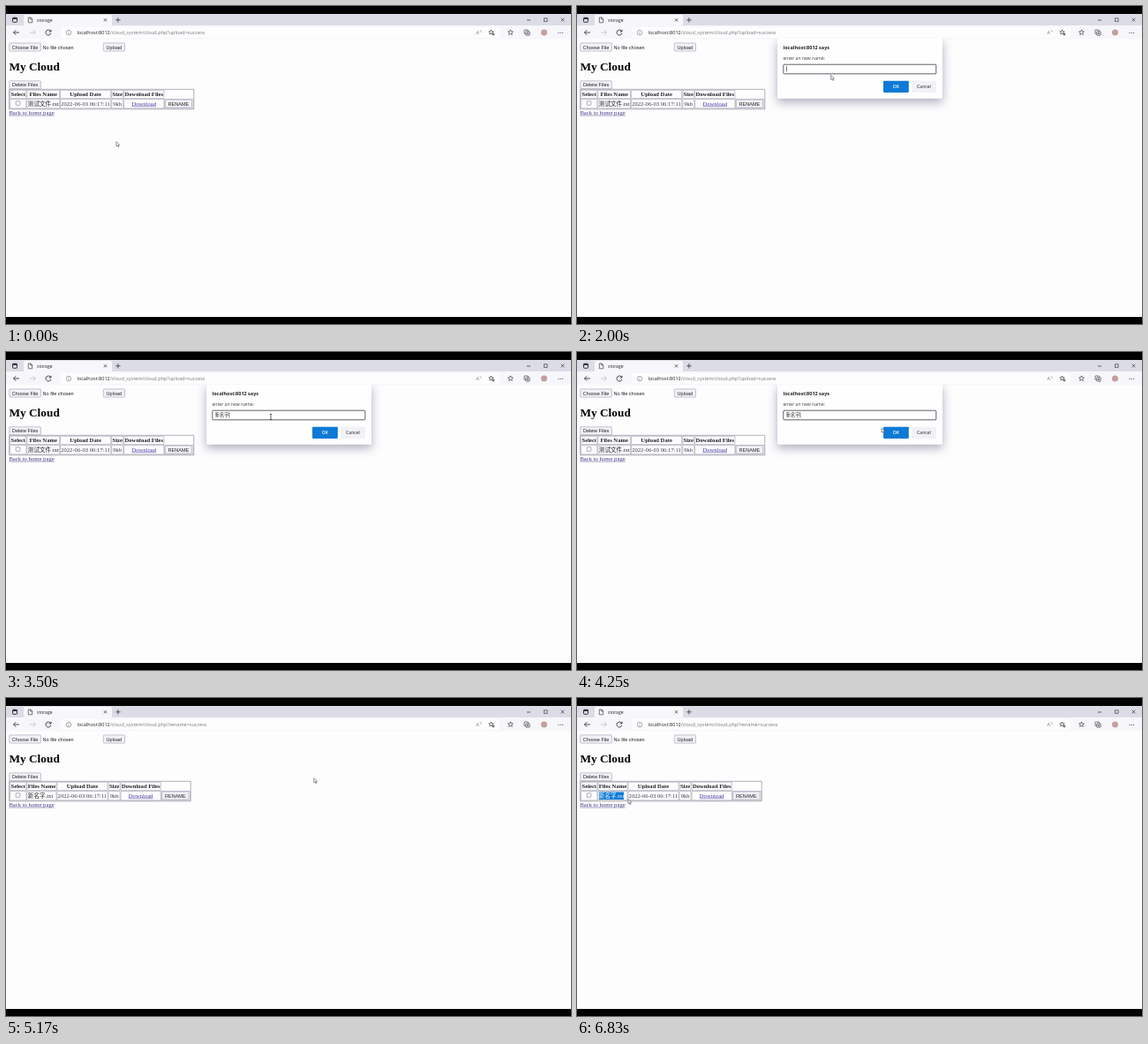
Recreate the animation shown at these times as an HTML page with a canvas. Size 640x360 px, loop 6.91 s.

```html
<!DOCTYPE html>
<html lang="en">
<head>
<meta charset="utf-8">
<title>Renaming a file</title>
<style>
  html, body { margin: 0; width: 100%; height: 100%; overflow: hidden; background: #000; }
  canvas { display: block; width: 100vw; height: 100vh; }
</style>
</head>
<body>
<canvas id="stage" width="640" height="360"></canvas>
<script>
const ctx = document.getElementById('stage').getContext('2d');
const LOOP = 6910, STEP = 83.3;
const UI = '"Open Sans", "Noto Sans CJK SC", sans-serif';
const ARIAL = '"Liberation Sans", sans-serif';
const TIMES = '"Liberation Serif", "Noto Sans CJK SC", serif';
const INK = '#202026', GREY = '#74747e', LINE = '#8e8e9e';
const BAR = '#dcdce6', TOOLBAR = '#f7f7fb', BLUE = '#0c7ad6';

const DIALOG_OPEN = 880, DIALOG_CLOSE = 4960, RELOADED = 5080;
const COMMIT = 3330, PRESS = 4640, SELECT_FROM = 6250, SELECT_TO = 6700;
const KEY_TIMES = [2330, 2415, 2500, 2640, 2720, 2830, 2920, 3080, 3160];

// Pointer stops: time, x, y
const POINTER = [
  [0, 125, 153.5], [80, 125, 153.5], [700, 195, 109], [900, 195, 109],
  [1150, 222, 103.5], [1550, 222, 103.5], [2150, 300, 73.5], [3830, 300, 73.5],
  [4450, 360, 90], [5080, 360, 90], [5850, 26.5, 108.5], [6250, 26.5, 108.5],
  [6750, 58, 114.5], [LOOP, 58, 114.5]
];

// Text is laid out large and scaled down so small sizes keep exact advances.
function text(str, x, y, size, family, color = INK, { align = 'left', weight = 400 } = {}) {
  ctx.save();
  ctx.translate(x, y);
  ctx.scale(0.1, 0.1);
  ctx.font = `${weight} ${size * 10}px ${family}`;
  ctx.textAlign = align;
  ctx.fillStyle = color;
  ctx.fillText(str, 0, 0);
  const width = ctx.measureText(str).width / 10;
  ctx.restore();
  return width;
}

function rect(x, y, w, h, fill, border, radius = 0, lineWidth = 0.6) {
  ctx.beginPath();
  ctx.roundRect(x, y, w, h, radius);
  if (fill) { ctx.fillStyle = fill; ctx.fill(); }
  if (border) { ctx.strokeStyle = border; ctx.lineWidth = lineWidth; ctx.stroke(); }
}

function stroke(path, color = INK, width = 0.7) {
  ctx.strokeStyle = color;
  ctx.lineWidth = width;
  ctx.stroke(new Path2D(path));
}

function circle(x, y, r, fill, border) {
  rect(x - r, y - r, r * 2, r * 2, fill, border, r);
}

function cross(x, y, r, color) {
  stroke(`M${x - r} ${y - r}l${r * 2} ${r * 2}m0 ${-r * 2}l${-r * 2} ${r * 2}`, color);
}

function star(x, y, r) {
  ctx.beginPath();
  for (let i = 0; i < 10; i++) {
    const a = -Math.PI / 2 + i * Math.PI / 5, d = i % 2 ? r * 0.45 : r;
    ctx.lineTo(x + d * Math.cos(a), y + d * Math.sin(a));
  }
  ctx.closePath();
  ctx.strokeStyle = INK;
  ctx.lineWidth = 0.6;
  ctx.stroke();
}

function drawBrowser(loading, query) {
  rect(0, 0, 640, 360, '#000');
  rect(0, 9, 640, 343, '#fdfdfe');
  rect(0, 9, 640, 13.5, BAR);
  rect(0, 22, 640, 15.5, TOOLBAR);
  rect(20, 10, 100, 13, TOOLBAR, null, [2, 2, 0, 0]);
  rect(62, 24, 497, 12, '#fdfdfe', null, 2);

  rect(7.5, 13.3, 5, 5, null, INK, 1, 0.9);
  rect(7.5, 13.3, 5, 1.6, INK);
  if (!loading) stroke('M25.3 13h2.6l1.8 1.8v4h-4.4zM27.7 13v2h2', INK, 0.6);
  text('storage', 35, 17.6, 5, UI);
  cross(112.5, 15.8, 1.6);
  stroke('M124.2 15.8h5.4m-2.7-2.7v5.4');
  stroke('M590 16h4');
  rect(609.5, 13.8, 3.6, 3.6, null, INK);
  cross(630.5, 15.6, 1.8);

  stroke('M15 30h-6.5m2.8-2.8l-2.8 2.8l2.8 2.8', INK, 0.8);
  stroke('M27 30h6.5m-2.8-2.8l2.8 2.8l-2.8 2.8', '#bcbcc6', 0.8);
  if (loading) cross(48, 30, 2.3);
  else stroke('M50.7 28.8a3 3 0 1 0 .2 2M51 26.8v2.2h-2.3', INK, 0.8);
  circle(71, 30.2, 2.8, null, GREY);
  stroke('M71 29.8v2M71 28.4v.7', GREY, 0.6);
  const host = text('localhost:8012', 80.5, 32.3, 5.52, UI);
  text('/cloud_system/cloud.php?' + query, 80.5 + host, 32.3, 5.52, UI, GREY);

  text('A', 532.5, 32.2, 5.5, UI, GREY);
  stroke('M537 27.2q1.4 1 1 2.6', GREY, 0.6);
  star(549.5, 29.8, 2.8);
  circle(552, 32, 1.4, GREY);
  star(571.5, 30, 3.1);
  rect(587, 27, 4.4, 4.6, null, INK, 0.7);
  rect(588.8, 28.8, 4.4, 4.4, TOOLBAR, INK, 0.7);
  stroke('M589.8 31h2.4m-1.2-1.2v2.4', INK, 0.6);
  circle(609.5, 30, 3.5, '#c3a09c');
  for (const x of [626, 628.3, 630.6]) circle(x, 30.2, 0.55, INK);
}

function button(label, x, y, w, h) {
  rect(x, y, w, h, '#f1f1f6', '#a0a0b2', 0.8);
  text(label, x + w / 2, y + h / 2 + 2, 5.55, ARIAL, INK, { align: 'center' });
}

function link(label, x, y, color, size = 6.62) {
  const width = text(label, x, y, size, TIMES, color);
  rect(x, y + 0.7, width, 0.5, color);
}

function drawPage(renamed, selection) {
  const shift = renamed ? -3.6 : 0;
  button('Choose File', 3.8, 41.9, 35.6, 9.2);
  text('No file chosen', 41.5, 48.5, 5.55, ARIAL);
  button('Upload', 110.3, 41.9, 24.2, 9.2);
  text('My Cloud', 3.4, 72.8, 13.33, TIMES, '#000', { weight: 700 });
  button('Delete Files', 3.8, 84.8, 35.6, 9);

  rect(3.6, 94.3, 209.2 + shift, 22.5, null, '#7c7c8c');
  const columns = [
    ['Select', 4.7, 18.2], ['Files Name', 23.8, 36.8 + shift],
    ['Upload Date', 61.5 + shift, 57.2], ['Size', 119.7 + shift, 13],
    ['Download Files', 133.7 + shift, 45.2], ['', 179.8 + shift, 32.2]
  ];
  for (const [title, x, w] of columns) {
    if (title) rect(x, 95.3, w, 9.3, null, LINE, 0, 0.5);
    rect(x, 105.5, w, 10.3, null, LINE, 0, 0.5);
    text(title, x + w / 2, 102.1, 6.62, TIMES, INK, { align: 'center', weight: 700 });
  }

  rect(11.2, 107.7, 4.6, 4.6, '#fff', GREY, 0.7);
  const name = renamed ? '新名字.txt' : '测试文件.txt';
  const nameWidth = text(name, 24.8, 112.9, 6.6, TIMES);
  if (selection > 0) {
    ctx.save();
    ctx.beginPath();
    ctx.rect(24.8, 106.3, nameWidth * selection, 8.6);
    ctx.clip();
    rect(24.8, 106.3, nameWidth, 8.6, BLUE);
    text(name, 24.8, 112.9, 6.6, TIMES, '#fff');
    ctx.restore();
  }
  text('2022-06-03 06:17:11', 62.2 + shift, 112.9, 6.6, TIMES, '#3a3a46');
  text('9kb', 126.2 + shift, 112.9, 6.6, TIMES, '#3a3a46', { align: 'center' });
  link('Download', 142.4 + shift, 112.9, '#4238a0');
  button('RENAME', 180.3 + shift, 106, 30.2, 9);
  link('Back to home page', 3.4, 123, '#443a86', 6.67);
}

function drawDialog(t, typed) {
  const committed = t >= COMMIT, pressed = t >= PRESS;
  ctx.save();
  ctx.beginPath();
  ctx.rect(0, 37, 640, 315);
  ctx.clip();
  ctx.shadowColor = 'rgba(70, 70, 110, .45)';
  ctx.shadowBlur = 11;
  ctx.shadowOffsetY = 4;
  rect(227, 37, 187, 67.8, '#fefefe', null, [0, 0, 1.5, 1.5]);
  ctx.restore();

  text('localhost:8012 says', 233.5, 48.6, 5.5, UI, INK, { weight: 700 });
  text('enter an new name:', 233.5, 61, 5.1, UI, '#3c3c44');
  rect(233.8, 66.2, 173, 10.6, '#fff', pressed ? '#dedee8' : '#50505a', 0.8, 0.9);
  rect(347, 84.7, 28.8, 13.2, pressed ? '#1069b4' : BLUE, null, 0.8);
  text('OK', 361.4, 93.2, 5.1, UI, '#fff', { align: 'center', weight: 600 });
  rect(379, 84.7, 28, 13.2, '#f1f1f6', null, 0.8);
  text('Cancel', 393, 93.2, 5.1, UI, INK, { align: 'center' });

  const value = committed ? '新名字' : typed;
  const width = text(value, 236.8, 73.2, committed ? 5.2 : 4.6, UI);
  if (typed && !committed) rect(236.8, 74.5, width, 0.5, INK);
  const caretOn = !pressed && ((t - DIALOG_OPEN) % 1060 < 530 || typed && !committed);
  if (caretOn) rect(237 + width, 68.3, 0.6, 6, INK);
}

function drawCandidates(typed) {
  const words = typed.length < 4 ? '新 心 信 欣 辛'
    : typed.length < 6 ? '信吗 新买 信吗 新闻 信条'
    : typed.length < 8 ? '新名 信明 新明 心明 新命'
    : '新名字 新 心 信 欣';
  const syllables = [typed.slice(0, 3), typed.slice(3, 7), typed.slice(7)].filter(Boolean);
  rect(237, 77, 151, 19.8, '#fefefe', '#e2e2ec', 0.5, 0.4);
  text(syllables.join("'"), 242, 81.6, 5.4, UI, '#34527e');
  words.split(' ').forEach((word, i) => {
    const x = 242 + i * 25;
    text(i + 1, x, 91.9, 4.8, UI, i ? '#8797ad' : '#c98a8a');
    text(word, x + 5, 92.3, 7, UI, i ? '#3d6788' : '#bd4a4a');
  });
  stroke('M375.5 89.8l1.4 1.5l-1.4 1.5M381.2 90.6l1.5 1.4l1.5-1.4', GREY);
  rect(383.5, 76.3, 5, 1.4, '#e0913f');
}

function pointerAt(t) {
  const i = Math.max(1, POINTER.findIndex(stop => stop[0] > t));
  const [t0, x0, y0] = POINTER[i - 1], [t1, x1, y1] = POINTER[i];
  const p = (t - t0) / (t1 - t0), eased = p * p * (3 - 2 * p);
  return [x0 + (x1 - x0) * eased, y0 + (y1 - y0) * eased];
}

function drawPointer(t, dialogOpen) {
  const [x, y] = pointerAt(t);
  const overInput = dialogOpen && x > 234 && x < 407 && y > 66 && y < 77;
  const overName = t > RELOADED && x > 24 && x < 53 && y > 105 && y < 114;
  ctx.save();
  ctx.translate(x, y);
  if (overInput || overName) {
    stroke('M-1.2 -3h2.4M0 -3v6M-1.2 3h2.4', INK, 0.7);
  } else {
    const arrow = new Path2D('M0 0v5.2l1.2-1.1l.9 2l.9-.4l-.9-1.9h1.6z');
    ctx.fillStyle = '#fff';
    ctx.fill(arrow);
    ctx.strokeStyle = '#50505c';
    ctx.lineWidth = 0.6;
    ctx.stroke(arrow);
  }
  ctx.restore();
}

function draw(now) {
  const t = Math.floor((now % LOOP + 4) / STEP) * STEP;
  const reloaded = t >= RELOADED;
  const dialogOpen = t >= DIALOG_OPEN && t < DIALOG_CLOSE;
  const typed = 'xinmingzi'.slice(0, KEY_TIMES.filter(k => k <= t).length);
  const selection = Math.min(1, Math.max(0, (t - SELECT_FROM) / (SELECT_TO - SELECT_FROM)));

  drawBrowser(t >= PRESS && !reloaded, (reloaded ? 'rename' : 'upload') + '=success');
  drawPage(reloaded, selection);
  if (dialogOpen) drawDialog(t, typed);
  if (typed && t < COMMIT) drawCandidates(typed);
  drawPointer(t, dialogOpen);
}

function frame() {
  draw(performance.now());
  requestAnimationFrame(frame);
}
frame();
</script>
</body>
</html>
```
